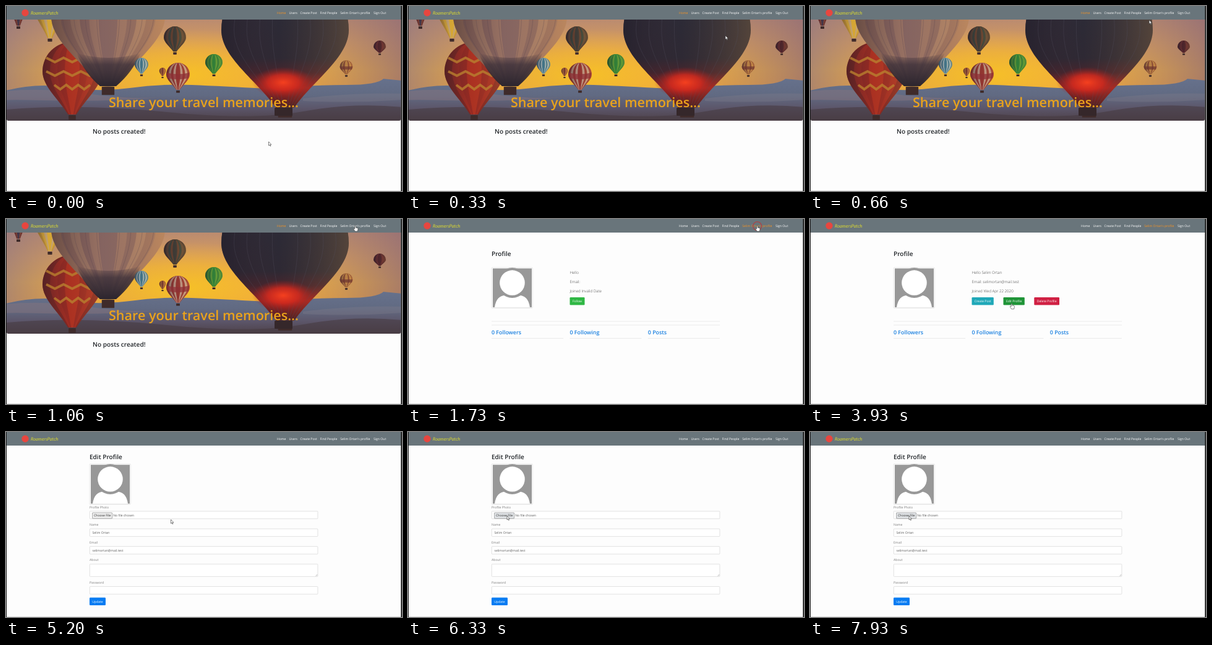
Write an HTML page that moves like this. It is 640x300 px and loops after 8 s.

```html
<!DOCTYPE html>
<html lang="en">
<head>
<meta charset="utf-8">
<title>RoamersPatch</title>
<style>
html, body { margin: 0; width: 100%; height: 100%; overflow: hidden; background: #fdfdfd; }
svg { display: block; width: 640px; height: 300px; }
text { font-family: "Open Sans", "Noto Sans", sans-serif; text-rendering: geometricPrecision; white-space: pre; }
.brand { font-family: Lato, sans-serif; font-style: italic; }
</style>
</head>
<body>
<svg id="stage" viewBox="0 0 640 300" xmlns="http://www.w3.org/2000/svg">
  <defs>
    <linearGradient id="sky" x1="0" y1="0" x2="0" y2="1">
      <stop offset="0" stop-color="#bd8c70"/><stop offset=".35" stop-color="#d99f5c"/>
      <stop offset=".7" stop-color="#eeae42"/><stop offset="1" stop-color="#eda53c"/>
    </linearGradient>
    <radialGradient id="sun" gradientUnits="userSpaceOnUse" cx="0" cy="0" r="1" gradientTransform="translate(285 112) scale(230 75)">
      <stop offset="0" stop-color="#ffc81e"/><stop offset=".5" stop-color="#fcbc2c" stop-opacity=".7"/>
      <stop offset="1" stop-color="#f5b040" stop-opacity="0"/>
    </radialGradient>
    <linearGradient id="dusk">
      <stop offset="0" stop-color="#8d7484" stop-opacity=".65"/><stop offset=".2" stop-color="#a5806f" stop-opacity=".15"/>
      <stop offset=".7" stop-color="#a5806f" stop-opacity=".05"/><stop offset="1" stop-color="#8c6876" stop-opacity=".7"/>
    </linearGradient>
    <linearGradient id="land" x1="0" y1="0" x2="0" y2="1">
      <stop offset="0" stop-color="#66718c"/><stop offset=".4" stop-color="#616a82"/>
      <stop offset=".7" stop-color="#5c566a"/><stop offset="1" stop-color="#4d4149"/>
    </linearGradient>
    <linearGradient id="navy" x1="0" y1="0" x2="0" y2="1">
      <stop offset="0" stop-color="#262c3a"/><stop offset=".65" stop-color="#2a2833"/>
      <stop offset=".75" stop-color="#45242c"/><stop offset=".86" stop-color="#a8221f"/><stop offset="1" stop-color="#4a1c1e"/>
    </linearGradient>
    <radialGradient id="flame">
      <stop offset="0" stop-color="#f5401f"/><stop offset=".5" stop-color="#d82a1d" stop-opacity=".8"/>
      <stop offset="1" stop-color="#a02020" stop-opacity="0"/>
    </radialGradient>
    <linearGradient id="shade">
      <stop offset="0" stop-color="#241c28" stop-opacity=".5"/><stop offset=".45" stop-color="#503038" stop-opacity=".1"/>
      <stop offset="1" stop-color="#ffb050" stop-opacity=".2"/>
    </linearGradient>
    <linearGradient id="skirt" x1="0" y1="0" x2="0" y2="1">
      <stop offset="0" stop-color="#40333c" stop-opacity="0"/><stop offset=".35" stop-color="#3c3039" stop-opacity=".8"/>
      <stop offset="1" stop-color="#2c252e"/>
    </linearGradient>
    <clipPath id="frame"><path d="M1 22H638V183a3 3 0 0 1-3 3H4a3 3 0 0 1-3-3Z"/></clipPath>
  </defs>
  <rect width="640" height="300" fill="#fdfdfd"/>
  <g id="home"></g>
  <g id="profile"></g>
  <g id="edit"></g>
  <g id="nav"></g>
  <path d="M0 299.5H640" stroke="#e2e2e2"/>
  <rect width="1" height="300" fill="#161616"/>
  <rect x="638.2" width="1.8" height="300" fill="#242424"/>
  <circle id="ring" fill="none" stroke="#d02a2a" stroke-width="1.1"/>
  <g id="cursor">
    <path id="arrow" d="M0 0V6.3L1.5 5L2.5 7.3L3.5 6.8L2.5 4.7H4.4Z" fill="#fff" stroke="#333" stroke-width=".6" stroke-linejoin="round"/>
    <path id="hand" d="M-.8 .5Q0-.6.8.5V3L3.7 3.7Q4.6 4 4.4 5.4L3.6 9H-.4L-2.6 5.4Q-2.8 4-1.6 4.4L-.8 5.2Z" fill="#fff" stroke="#333" stroke-width=".6" stroke-linejoin="round"/>
  </g>
</svg>
<script>
const LOOP = 8000;
const USER = 'Selim Ortan', MAIL = 'selimortan@mail.test';
const PROFILE_AT = 1560, LOADED_AT = 1800, EDIT_AT = 4400;
const el = id => document.getElementById(id);
const add = (id, ...parts) => el(id).insertAdjacentHTML('beforeend', parts.join(''));

const text = (x, y, s, size, fill, more = '') =>
  `<text x="${x}" y="${y}" font-size="${size}" fill="${fill}" ${more}>${s}</text>`;
const box = (x, y, w, h, fill, more = '') =>
  `<rect x="${x}" y="${y}" width="${w}" height="${h}" fill="${fill}" ${more}/>`;
const path = (d, fill, more = '') => `<path d="${d}" fill="${fill}" ${more}/>`;
const heading = (x, y, s, size = 10.05, fill = '#212529') => text(x, y, s, size, fill, 'font-weight="600"');
const button = (x, y, w, s, fill, id = '') =>
  box(x, y, w, 12.5, fill, `rx="1.3" ${id && `id="${id}"`}`) +
  text(x + w / 2, y + 8, s, 5.05, '#fff', 'text-anchor="middle"');
const line = (x, y, w) => box(x, y - .3, w, .6, '#dedede');

// Balloon: nested teardrops make the vertical stripes
function drop(cx, top, r, h, k) {
  const w = r * k, n = r * .14 * k, mid = top + r, end = top + h, pull = (h - r) * .35;
  const knee = n + (w - n) * .35;
  return `M${cx - w} ${mid}A${w} ${r} 0 0 1 ${cx + w} ${mid}` +
    `C${cx + w} ${mid + pull} ${cx + knee} ${end - pull} ${cx + n} ${end}H${cx - n}` +
    `C${cx - knee} ${end - pull} ${cx - w} ${mid + pull} ${cx - w} ${mid}Z`;
}
function balloon(cx, top, r, h, ...fills) {
  const half = Math.max(1.6, r * .1 + 1);
  return fills.map((f, i) => path(drop(cx, top, r, h, 1 - i / fills.length), f)).join('') +
    path(drop(cx, top, r, h, 1), 'url(#shade)') +
    box(cx - half, top + h + 1, half * 2, half * 1.3, '#3f2b2a', 'rx=".6"');
}
const ribs = (cx, top, r, h, color) => [.8, .6, .4, .2].map(k =>
  path(drop(cx, top, r, h, k), 'none', `stroke="${color}" stroke-width=".7" opacity=".45"`)).join('');
const patches = (y, w) => path(
  `M${107 - w} ${y}l${w / 3} 7l${w / 3}-7l${w / 3} 7l${w / 3}-7l${w / 3} 7l${w / 3}-7`,
  'none', 'stroke="#b9802f" stroke-width="4" opacity=".8"');

add('home',
  '<g clip-path="url(#frame)">',
  box(0, 22, 640, 115, 'url(#sky)'), box(0, 22, 640, 115, 'url(#sun)'), box(0, 22, 640, 115, 'url(#dusk)'),
  path('M0 137Q50 124 100 132T200 133Q250 126 300 128T420 134Q500 128 550 128T610 118L640 121V186H0Z', 'url(#land)'),
  path('M0 138Q60 132 130 142T250 148Q160 156 60 153T0 158Z', '#85747e', 'opacity=".5"'),
  path('M480 150Q560 140 640 142V152Q560 158 480 154Z', '#7a7888', 'opacity=".4"'),
  path('M0 168Q120 158 260 172T480 171T640 164V186H0Z', '#463b42', 'opacity=".6"'),
  balloon(20, -40, 20, 72, '#6a302e', '#7c4336', '#3d344a'),
  balloon(71, -26, 26, 78, '#c99a34', '#e0b138', '#cfae78', '#e3b334'),
  balloon(107, 58, 48, 118, '#86261f', '#a82c20', '#9c2920', '#b5311f'),
  patches(84, 42), patches(106, 42), patches(128, 29),
  balloon(165, -75, 92, 205, '#a97c62', '#977062', '#a8806a', '#8e6b63', '#a07968', '#8b6a65'),
  ribs(165, -75, 92, 205, '#55424c'),
  path('M114 76Q166 92 218 76Q204 108 178 130H152Q126 108 114 76Z', 'url(#skirt)'),
  balloon(451, -64, 103, 229, 'url(#navy)'),
  ribs(451, -64, 103, 229, '#53505f'),
  '<ellipse cx="448" cy="124" rx="50" ry="25" fill="url(#flame)"/>',
  box(434, 165, 29, 13, '#35272a', 'rx="1"'),
  balloon(273, 33, 18, 41, '#40352e', '#5b4634', '#34433a', '#64422f', '#3a3b35'),
  balloon(219, 84, 11, 26, '#4b8294', '#a9bfc0', '#3f7a90', '#9fb9bc', '#3f7a90'),
  balloon(253, 100, 5.3, 14, '#954a2d', '#bc7c3a', '#7c3a30'),
  balloon(278, 92, 19, 44, '#9c3a30', '#c79f88', '#9a3831', '#c29a86', '#98352f'),
  path('M259.5 108Q278 113 296.5 108L295 117Q278 121 261 117Z', '#8e2f35', 'opacity=".75"'),
  balloon(336, 78, 14, 32, '#2a8233', '#4a9c33', '#2a8035', '#5da337', '#2c8737'),
  balloon(550, 88, 10.5, 23, '#9a5a38', '#c58c46', '#8c4c34', '#c08644'),
  path('M540 98h20l-1 5h-18Z', '#6d3530', 'opacity=".7"'),
  balloon(604, 56, 10, 20, '#4c232a', '#632b2e', '#4a2229'),
  '</g>',
  heading(166, 164, 'Share your travel memories...', 21.6, '#eaa31c'),
  heading(140, 207, 'No posts created!', 10.15));

const avatar = y => `<g transform="translate(135 ${y})">` +
  box(.2, .2, 66, 65.6, '#fff', 'stroke="#dcdcdc" stroke-width=".7" rx="1"') +
  box(2, 1.6, 63, 63, '#989898') +
  path('M5 64.6C7 51 13 46 23 45H44C54 46 60 51 62 64.6Z', '#fff') +
  '<circle cx="33.5" cy="24.8" r="24.5" fill="#989898"/><circle cx="33.5" cy="24.8" r="20.3" fill="#fff"/></g>';

const info = (y, s) => text(261.5, y, s, 6.2, '#333', 'font-weight="300"');
const stat = (x, s) => heading(x, 186.8, s, 8.85, '#1a80e0') + line(x, 193.5, 116);

add('profile',
  heading(135, 60.3, 'Profile'), avatar(78.6),
  '<g id="empty">',
  info(88.7, 'Hello'), info(104, 'Email:'), info(119.2, 'Joined Invalid Date'),
  button(261.5, 127, 24, 'Follow', '#2fb744'),
  '</g><g id="loaded">',
  info(88.7, 'Hello ' + USER), info(104, 'Email: ' + MAIL), info(119.2, 'Joined Wed Apr 22 2020'),
  button(261.5, 127, 35.3, 'Create Post', '#20a8b8'),
  button(312.5, 127, 34.3, 'Edit Profile', '#2ba84a', 'editBtn'),
  button(362.3, 127, 40.7, 'Delete Profile', '#d02043'),
  '</g>',
  line(135, 166, 369), line(135, 172, 369),
  stat(135, '0 Followers'), stat(261.5, '0 Following'), stat(387.8, '0 Posts'));

const field = (label, y, h, value = '') =>
  text(135, y - 4.8, label, 5.15, '#7b7b7b') +
  box(135.3, y, 368.6, h, '#fff', 'stroke="#cfcfcf" stroke-width=".6" rx="1"') +
  text(139.5, y + 8.2, value, 5.05, '#555');

add('edit',
  heading(135, 43.8, 'Edit Profile'), avatar(51.6),
  field('Profile Photo', 128.4, 12.3),
  box(139.6, 130.9, 32, 9.3, '#efefef', 'id="choose" stroke="#777" stroke-width=".6" rx=".5"'),
  text(142, 137.4, 'Choose File', 5.15, '#222'),
  text(173.2, 137.4, 'No file chosen', 5.1, '#555'),
  field('Name', 157, 12.4, USER),
  field('Email', 185.6, 12.4, MAIL),
  field('About', 214.2, 20.2),
  path('M500.5 233.5l2.6-2.6M502 233.5l1.1-1.1', 'none', 'stroke="#888" stroke-width=".5"'),
  field('Password', 250.6, 12.4),
  button(135, 268.5, 26, 'Update', '#087cf2'));

const link = (x, s, id = '') => text(x, 13, s, 5.1, '#fff', id && `id="${id}"`);
add('nav',
  box(0, 0, 640, 22, '#69757b'),
  '<circle cx="31" cy="11" r="5.7" fill="#e8463f"/>',
  text(40, 13.8, 'RoamersPatch', 7.5, '#dbd931', 'class="brand"'),
  link(438, 'Home', 'homeLink'), link(457.5, 'Users'), link(475.5, 'Create Post'),
  link(507.5, 'Find People'), link(540.2, USER + "'s profile", 'userLink'), link(594, 'Sign Out'));

// Pointer stops: time, x, y
const stops = [
  [0, 424.5, 220], [60, 424.5, 220], [330, 513, 48], [860, 564.5, 11], [2060, 564.5, 11],
  [3730, 326, 137], [4400, 326, 137], [5200, 266.5, 142], [6330, 160, 136], [LOOP, 160, 136]];
const clicks = [1460, 4060];
const smooth = p => p * p * (3 - 2 * p);

function pointer(t) {
  const i = stops.findIndex(s => t < s[0]);
  const [t0, x0, y0] = stops[i - 1], [t1, x1, y1] = stops[i];
  const p = smooth((t - t0) / (t1 - t0));
  return [x0 + (x1 - x0) * p, y0 + (y1 - y0) * p];
}

const show = (id, on) => el(id).setAttribute('display', on ? 'inline' : 'none');
const paint = (id, fill) => el(id).setAttribute('fill', fill);
const within = (x, y, l, t, r, b) => x >= l && x <= r && y >= t && y <= b;

function draw(t) {
  const page = t < PROFILE_AT ? 'home' : t < EDIT_AT ? 'profile' : 'edit';
  for (const p of ['home', 'profile', 'edit']) show(p, p === page);
  show('empty', t < LOADED_AT);
  show('loaded', t >= LOADED_AT);
  paint('homeLink', page === 'home' ? '#f79423' : '#fff');
  paint('userLink', page === 'profile' ? '#f79423' : '#fff');

  const [x, y] = pointer(t);
  const onEdit = page === 'profile' && within(x, y, 312, 127, 347, 140);
  const onNav = within(x, y, 438, 7, 615, 16);
  paint('editBtn', onEdit ? '#1f9437' : '#2ba84a');
  paint('choose', page === 'edit' && within(x, y, 139, 131, 172, 140) ? '#e2e5e8' : '#efefef');
  el('cursor').setAttribute('transform', `translate(${x} ${y})`);
  show('hand', onEdit || onNav);
  show('arrow', !onEdit && !onNav);

  const start = clicks.find(c => t >= c && t < c + 340);
  show('ring', start !== undefined);
  if (start !== undefined) {
    const p = (t - start) / 340, ring = el('ring');
    ring.setAttribute('cx', x);
    ring.setAttribute('cy', y + .5);
    ring.setAttribute('r', 2 + 6.3 * p);
    ring.setAttribute('opacity', 1 - .3 * p);
  }
}

const begin = performance.now();
function tick() {
  draw((performance.now() - begin) % LOOP);
  requestAnimationFrame(tick);
}
tick();
</script>
</body>
</html>
```
